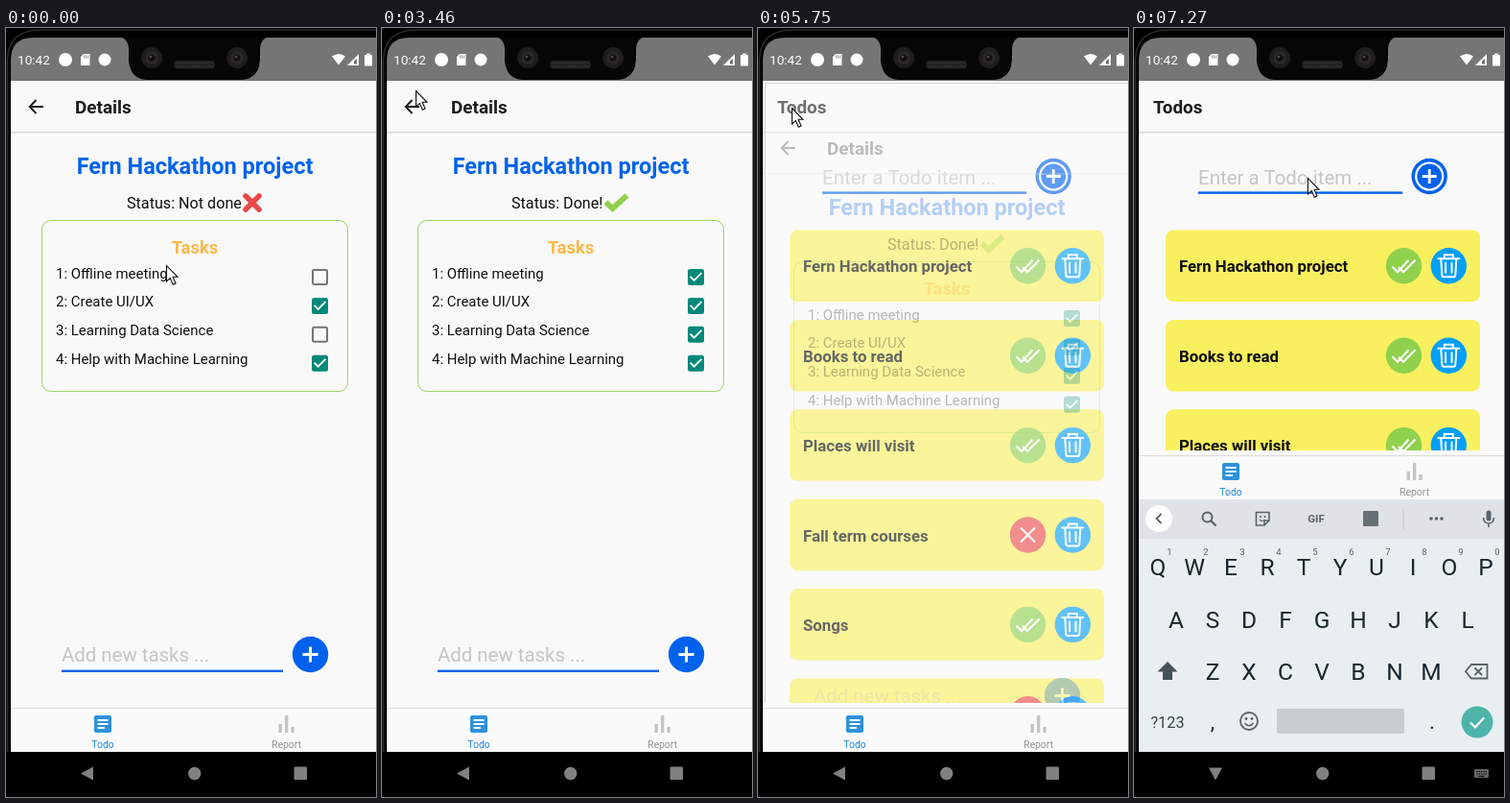
Write an HTML page that moves like this. It is 386x801 px and loops after 8 s.

```html
<!DOCTYPE html>
<html lang="en">
<head>
<meta charset="utf-8">
<title>Todo app</title>
<style>
  html, body { margin: 0; width: 100%; height: 100%; overflow: hidden; background: #000; }
  svg { display: block; width: 386px; height: 801px; font-family: Roboto, "Open Sans", sans-serif; }
</style>
</head>
<body>
<svg id="stage" viewBox="0 0 386 801" xmlns="http://www.w3.org/2000/svg"></svg>
<script>
const LOOP = 8000;
const BLUE = '#0062ec', TEAL = '#00897b', LIME = '#8fd14d', PAPER = '#f9f9f9', NAV = '#808080';
const PROJECT = 'Fern Hackathon project';

// Markup helpers
const rect = (x, y, w, h, fill, extra = '') =>
  `<rect x="${x}" y="${y}" width="${w}" height="${h}" fill="${fill}" ${extra}/>`;
const disc = (x, y, r, fill, extra = '') =>
  `<circle cx="${x}" cy="${y}" r="${r}" fill="${fill}" ${extra}/>`;
const shape = (d, fill, extra = '') => `<path d="${d}" fill="${fill}" ${extra}/>`;
const line = (d, color, width, extra = '') =>
  `<path d="${d}" fill="none" stroke="${color}" stroke-width="${width}" ${extra}/>`;
const text = (x, y, size, fill, content, extra = '') =>
  `<text x="${x}" y="${y}" font-size="${size}" fill="${fill}" ${extra}>${content}</text>`;
const group = (content, extra = '') => `<g ${extra}>${content}</g>`;
const BOLD = 'font-weight="700"', MID = 'text-anchor="middle"';
const plus = (x, y, r, w) => line(`M${x - r} ${y}h${2 * r}M${x} ${y - r}v${2 * r}`, '#fff', w);

function header(title, x) {
  return rect(5, 108, 381, 1, '#d6d6d6') + rect(5, 109, 381, 1, '#ececec') +
    text(x, 89, 18.9, '#1c1c1e', title, BOLD);
}

function phone() {
  return rect(0, 0, 386, 801, '#000') +
    line('M1.5 801V34Q2 3 34 2H386', '#2c2c2c', 1.6) +
    shape('M5 56V34Q5 10 28 10H386V56Z', '#757575') +
    shape('M118 9Q128 11 128 22V33Q129 54 149 54H244Q264 54 265 33V22Q265 11 275 9Z', '#060606') +
    [[152, 31], [241, 31]].map(([x, y]) =>
      disc(x, y, 11, '#1d1d1d') + disc(x, y, 7, '#2b2826') + disc(x, y, 3.5, '#111') +
      disc(x - 1, y - 1, 1.2, '#5a4d45')).join('') +
    rect(175, 34, 43, 8.5, '#222', 'rx="4"') +
    line('M178 36.5H216M178 40H216', '#3d3d3d', 1.2, 'stroke-dasharray="1.3 1.3"');
}

function statusBar() {
  return text(12, 38, 13.6, '#fff', '10:42') + disc(62, 33, 7, '#fff') +
    shape('M81 27H87.5V39H78V30Z', '#fff') +
    line('M81.5 28.5v3M83.5 28.5v3M85.5 28.5v3', '#757575', .8) +
    disc(103, 33, 6.5, '#fff') +
    shape('M340 29.5Q347 24.5 354 29.5L347 38.5Z', '#fff') +
    shape('M368 27V39H356Z', '#fff') + shape('M366 32V37.5H363V34.5Z', '#757575') +
    shape('M374 28H376V26.5H380V28H382V39.5H374Z', '#fff');
}

function checkbox(i) {
  const y = 259.5 + 29.9 * i;
  return group(
    `<circle id="ripple${i}" r="0" fill="#dadada"/>` +
    `<rect id="box${i}" x="-7.5" y="-7.5" width="15" height="15" rx="1.5" stroke-width="2"/>` +
    `<path id="tick${i}" d="M-5.9 -.6L-1.9 3.4L5.9 -4.4" fill="none" stroke="#fff" stroke-width="1.9"/>`,
    `transform="translate(327.5 ${y})"`);
}

function details() {
  const tasks = ['Offline meeting', 'Create UI/UX', 'Learning Data Science', 'Help with Machine Learning'];
  return `<rect id="press" x="11" y="62" width="40" height="40" fill="#fff"/>` +
    header('Details', 72) +
    line('M39 82H25M31.5 75L24.7 82L31.5 89', '#1c1c1e', 1.9) +
    text(197, 151.5, 23.5, BLUE, PROJECT, `${BOLD} ${MID}`) +
    group(text(126, 188, 16.15, '#111', 'Status: Not done') +
      line('M250 175L264 189M264 175L250 189', '#e94848', 5.6, 'stroke-linecap="round"'), 'id="open"') +
    group(text(135, 188, 16.15, '#111', 'Status: Done!') +
      line('M233.5 181.5L240.5 188L255.5 174.5', LIME, 5.8), 'id="done"') +
    rect(37.5, 200.5, 319, 178, 'none', 'rx="9" stroke="#9bd563"') +
    text(197, 234.5, 18.4, '#fbb845', 'Tasks', `${BOLD} ${MID}`) +
    tasks.map((name, i) => text(52, 260.6 + 29.8 * i, 14.98, '#111', `${i + 1}: ${name}`) + checkbox(i)).join('') +
    text(58, 660, 20.4, '#c5c5c5', 'Add new tasks ...') +
    rect(58, 668.6, 231, 2.4, BLUE) + disc(317.5, 652.5, 18.7, BLUE) + plus(317.5, 652.5, 8, 3);
}

function todoCard(name, finished, i) {
  const y = 210.5 + 93.4 * i, cy = y + 37.3;
  const mark = finished
    ? 'M-12 1L-6.5 6.5L5 -6M-5.5 1.5L-.5 6.5L12 -6'
    : 'M-7.5 -7.5L7.5 7.5M7.5 -7.5L-7.5 7.5';
  const bin = 'M-11 -7.5H11M-4.5 -8V-11.5H4.5V-8M-8 -7L-7 9.5Q-6.8 11.5 -5 11.5H5Q6.8 11.5 7 9.5L8 -7M-3.2 -3V7M3.2 -3V7';
  return rect(33, y, 328, 74.5, '#f9f05f', 'rx="8"') +
    text(47, y + 43.8, 16.8, '#0c0c0c', name, BOLD) +
    disc(281.5, cy, 18.7, finished ? LIME : '#eb4a48') +
    line(mark, '#fff', 2.1, `transform="translate(281.5 ${cy})"`) +
    disc(328.3, cy, 18.7, '#049ff6') +
    line(bin, '#fff', 2, `transform="translate(328.3 ${cy})" stroke-linecap="round"`);
}

function todos() {
  const items = [[PROJECT, 1], ['Books to read', 1], ['Places will visit', 1],
    ['Fall term courses', 0], ['Songs', 1], ['', 0]];
  return rect(5, 55, 381, 654, PAPER) + header('Todos', 20) +
    text(67, 162.5, 20.5, '#c5c5c5', 'Enter a Todo item ...') + rect(67, 170.4, 213, 2.4, BLUE) +
    `<rect id="caret" x="67" y="140" width="1.7" height="28" fill="${TEAL}"/>` +
    disc(308.2, 154.5, 18.7, BLUE) + disc(308.2, 154.5, 14, 'none', 'stroke="#fff" stroke-width="2.2"') +
    plus(308.2, 154.5, 7.5, 2.8) +
    group(items.map(([name, finished], i) => todoCard(name, finished, i)).join(''), 'clip-path="url(#list)"');
}

function tabs() {
  return rect(5, 703, 381, 51, '#fafafa') + rect(5, 708, 381, 1, '#dcdcdc') +
    rect(92, 716, 18, 18, '#2e92dc', 'rx="2"') +
    line('M95.5 721H106.5M95.5 725H106.5M95.5 729H103', '#fff', 2) +
    text(101, 749.5, 10.4, '#1f86e6', 'Todo', MID) +
    line('M286.2 725V734M292.6 716V734M299 728V734', '#c4c4c4', 3.4) +
    text(292.5, 749.5, 10.5, '#949494', 'Report', MID);
}

function keyboard() {
  const INK = '#17272d', GREY = '#59646a';
  const row = (keys, x, y) => [...keys].map((key, i) => text(x + 38 * i, y, 24.5, INK, key, MID)).join('');
  return rect(5, 491, 381, 263, '#e9eef1') + rect(5, 491, 381, 41, '#dfe3e5') +
    disc(26, 511, 14, '#fdfdfd') + line('M28.5 506L23.5 511L28.5 516', GREY, 1.8) +
    disc(76.5, 509.5, 5, 'none', `stroke="${GREY}" stroke-width="2"`) + line('M80 513L85.5 518.5', GREY, 2.2) +
    line('M127.5 504.5H141V513L136 518H127.5ZM136 518V513H141', GREY, 1.6) +
    disc(132, 509, 1, GREY) + disc(136.5, 509, 1, GREY) + line('M131 512Q134 515 136 512', GREY, 1.2) +
    text(190, 515, 11.5, GREY, 'GIF', `${BOLD} ${MID}`) +
    rect(239, 503, 16, 16, '#667177', 'rx="1"') + rect(280.5, 501, 1, 21, '#c2c8cb') +
    [310, 315.5, 321].map(x => disc(x, 511, 1.8, GREY)).join('') +
    rect(367.5, 502.5, 5, 11, GREY, 'rx="2.5"') +
    line('M364.5 510Q365 516 370 516Q375 516 375.5 510M370 516V520', GREY, 1.6) +
    row('QWERTYUIOP', 25, 569.5) +
    [...'1234567890'].map((n, i) => text(37 + 38 * i, 549, 9.5, GREY, n, MID)).join('') +
    row('ASDFGHJKL', 44, 624.5) + row('ZXCVBNM', 82, 679) +
    shape('M35 660L45.5 670.5H40V679H30V670.5H24.5Z', '#43535a') +
    line('M352 663H368.5V677.5H352L346 670.2ZM355.5 666.5L363 674M363 666.5L355.5 674', GREY, 1.8) +
    text(35, 728.5, 16.3, '#36454b', '?123', MID) + text(82, 730, 22, INK, ',', MID) +
    disc(120, 722, 9, 'none', `stroke="${GREY}" stroke-width="1.8"`) +
    disc(117, 719.5, 1.4, GREY) + disc(123, 719.5, 1.4, GREY) + line('M115.5 724Q120 729.5 124.5 724', GREY, 1.6) +
    rect(149, 709, 133, 26, '#c8cdd0', 'rx="2"') + text(311, 730, 22, INK, '.', MID) +
    disc(358, 723, 16.5, '#4eb4aa') + line('M351 723.5L356 728.5L365 718.5', '#fff', 2.2);
}

function navBar() {
  const dots = 'M357.5 774.5h11M357.5 777h11';
  return rect(0, 754, 386, 47, '#000') +
    `<path id="back" d="M-7 0L6 -7V7Z" fill="${NAV}"/>` +
    disc(196.7, 776.5, 6.7, NAV) + rect(300.5, 769.5, 13.5, 13.5, NAV, 'rx="1"') +
    group(rect(355, 772, 15, 9, '#666', 'rx="1"') +
      line(dots, '#000', 1.2, 'stroke-dasharray="1.3 1"') + line('M359.5 779.4h6', '#000', 1), 'id="keysIcon"');
}

const stage = document.getElementById('stage');
stage.innerHTML =
  `<defs>
    <clipPath id="list"><rect id="listClip" x="5" y="109" width="381" height="595"/></clipPath>
    <clipPath id="screen"><rect x="5" y="55" width="381" height="653"/></clipPath>
    <clipPath id="above"><rect x="0" y="0" width="386" height="754"/></clipPath>
  </defs>` + phone() + statusBar() +
  group(
    group(todos(), 'id="todos"') +
    rect(5, 55, 381, 654, PAPER, 'id="wash"') +
    rect(7.5, 57.5, 390, 700, 'none', 'id="edge" stroke="#d4d4d4"') +
    group(details(), 'id="details"'), 'clip-path="url(#screen)"') +
  group(group(tabs(), 'id="tabs"') + group(keyboard(), 'id="keys"'), 'clip-path="url(#above)"') +
  navBar() +
  `<path id="cursor" d="M.5 .5V17L4.3 13.4L7.2 20.2L10 19L7.1 12.3H12Z" fill="#fff" stroke="#111" stroke-width="1.1"/>`;

const el = Object.fromEntries([...stage.querySelectorAll('[id]')].map(node => [node.id, node]));
const set = (id, attrs) => { for (const key in attrs) el[id].setAttribute(key, attrs[key]); };
const show = (id, visible) => set(id, { visibility: visible ? 'visible' : 'hidden' });

// The picture updates in held steps: each entry is [time, ...values].
const held = (track, t) => track.filter(step => step[0] <= t).pop().slice(1);

const pointer = [
  [0, 167, 247], [280, 225, 247], [430, 264, 243], [550, 301, 242], [670, 328, 246], [820, 333, 254],
  [1510, 333, 284], [1640, 331, 319], [1790, 329, 330], [1920, 329, 334], [2640, 325, 325],
  [2790, 162, 205], [2920, 0, 101], [3220, 10, 93], [3340, 26, 76], [3460, 35, 65],
  [4770, 35, 77], [4930, 35, 83], [5890, 115, 112], [6010, 167, 132],
  [6160, 173, 143], [6290, 178, 151], [6410, 181, 156]
];
// Checkbox tracks: ripple radius, ripple opacity, filled, tick scale
const ON = [0, 0, 0, 1, 1];
const boxes = [
  [[0, 0, 0, 0, 0], [1370, 18.5, 1, 1, .1], [1510, 18.5, .5, 1, .7], [1640, 0, 0, 1, .9], [1790, 0, 0, 1, 1]],
  [ON],
  [[0, 0, 0, 0, 0], [2340, 16.5, .9, 0, 0], [2490, 16.5, .9, 1, .1], [2640, 16.5, .9, 1, .8], [2790, 0, 0, 1, 1]],
  [ON]
];
const press = [[0, 0], [5350, .4], [5480, .7], [5600, 1]];
// Offset, background opacity, content opacity of the leaving screen
const leave = [[0, 0, 1, 1], [5750, 43, .38, .28], [5890, 50, .12, .08], [6010, 52, 0, 0]];
// Keyboard open flag, remaining slide, back-button rotation
const board = [[0, 0, 0, 0], [7120, 1, 70, -45], [7270, 1, 0, -90]];

function draw(t) {
  const [x, y] = held(pointer, t);
  set('cursor', { transform: `translate(${x} ${y})` });

  boxes.forEach((track, i) => {
    const [radius, alpha, filled, scale] = held(track, t);
    set('ripple' + i, { r: radius, opacity: alpha });
    set('box' + i, { fill: filled ? TEAL : 'none', stroke: filled ? TEAL : '#757575' });
    set('tick' + i, { transform: `scale(${scale})`, opacity: filled });
  });
  show('open', t < 2490);
  show('done', t >= 2490);

  const [drop, washAlpha, alpha] = held(leave, t);
  set('press', { opacity: t < 5750 ? held(press, t)[0] : 0 });
  set('wash', { opacity: washAlpha });
  set('details', { opacity: alpha, transform: `translate(0 ${drop})` });
  show('todos', t >= 5750);
  show('edge', t >= 5750 && t < 5890);

  const [open, slide, turn] = held(board, t);
  set('listClip', { height: open ? 331 : 595 });
  set('tabs', { transform: `translate(0 ${open ? -263 : 0})` });
  set('keys', { transform: `translate(0 ${slide})` });
  set('back', { transform: `translate(85 776.5) rotate(${turn})` });
  show('keys', open);
  show('caret', t >= 6810 && t < 7270);
  show('keysIcon', t >= 6950);
}

function frame(now) {
  draw(now % LOOP);
  requestAnimationFrame(frame);
}
draw(0);
requestAnimationFrame(frame);
</script>
</body>
</html>
```
